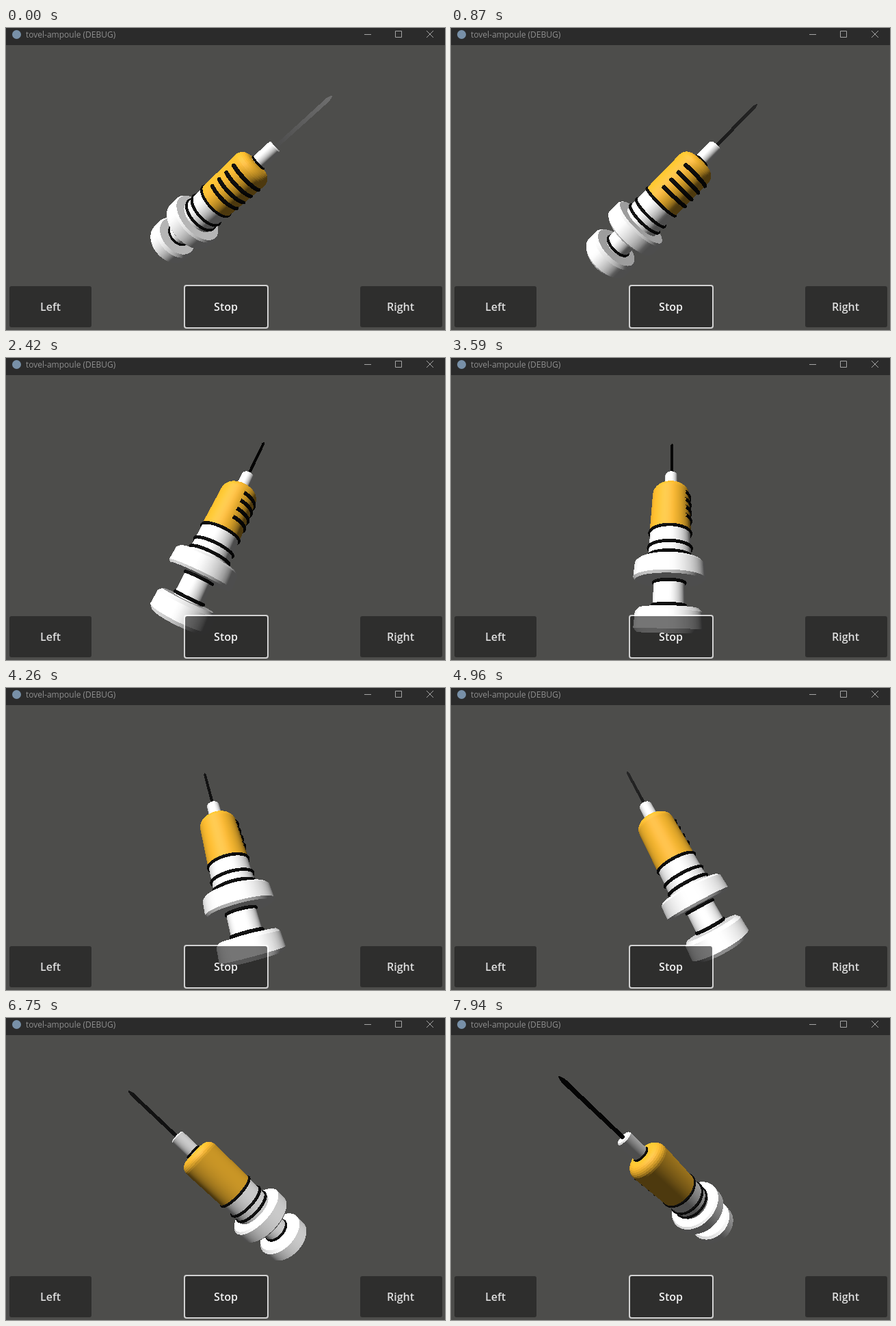
Recreate the animation shown at these times as an HTML page with a canvas. Size 642 by 441 pixels, loop 7.99 s.

```html
<!DOCTYPE html>
<html lang="en">
<head>
<meta charset="utf-8">
<title>Syringe</title>
<style>
  html, body { margin: 0; width: 100%; height: 100%; overflow: hidden; background: #4d4d4b; }
  canvas { display: block; }
</style>
</head>
<body>
<canvas id="stage" width="642" height="441"></canvas>
<script>
const W = 642, H = 441, LOOP = 7990, STEP = 50;
const ctx = document.getElementById('stage').getContext('2d');
const image = ctx.createImageData(W, H);
const pixels = new Uint32Array(image.data.buffer);
const nearest = new Float32Array(W * H);

// Camera: one unit from the pivot, pitched down
const FOCAL = 271, CX = 321, CY = 235;
const PITCH = 15 * Math.PI / 180, TILT = 44.5 * Math.PI / 180;
const SPIN = 0.5, FACING_AWAY = 3.6;
const SAG = 0.014; // how far the body's axis lies below the pivot
const AMBIENT = 0.0718, SUN = 1.1;
const BACK = 0xff4b4d4d;
const SEGMENTS = 48;

const unit = v => { const l = Math.hypot(...v) || 1; return v.map(k => k / l); };
const LIGHT = unit([-0.41, 0.715, 0.57]);
const HALF = unit([LIGHT[0], LIGHT[1], LIGHT[2] + 1]);
const dot = (a, b) => a[0] * b[0] + a[1] * b[1] + a[2] * b[2];

const WHITE = { albedo: [1, 1, 1], gloss: 0.05 };
const ORANGE = { albedo: [1, 0.52, 0.025], gloss: 0.06 };
const BLACK = { albedo: [0.002, 0.002, 0.002], gloss: 0.004 };
const NEEDLE = { metal: true };

// Body space: [along the axis, sideways, upwards]
const meshes = [];

// A profile is a list of [position, radius] with rising position
function revolve(mat, profile) {
  for (let i = 1; i < profile.length; i++) {
    const [s0, r0] = profile[i - 1], [s1, r1] = profile[i];
    const [ns, nr] = unit([r0 - r1, s1 - s0]);
    const row = (s, r) => Array.from({ length: SEGMENTS + 1 }, (_, k) => {
      const a = k / SEGMENTS * 2 * Math.PI, x = Math.sin(a), y = Math.cos(a);
      return { p: [s, r * x, r * y - SAG], n: [ns, nr * x, nr * y] };
    });
    meshes.push({ mat, rows: [row(s0, r0), row(s1, r1)] });
  }
}

function hoop(s, radius, tube, from = 0, to = 2 * Math.PI) {
  const count = Math.ceil(SEGMENTS * (to - from) / (2 * Math.PI));
  const rows = [];
  for (let j = 0; j <= 8; j++) {
    const b = j / 8 * 2 * Math.PI, ns = Math.sin(b), nr = Math.cos(b);
    rows.push(Array.from({ length: count + 1 }, (_, k) => {
      const a = from + (to - from) * k / count, x = Math.sin(a), y = Math.cos(a);
      const r = radius + tube * nr;
      return { p: [s + tube * ns, r * x, r * y - SAG], n: [ns, nr * x, nr * y] };
    }));
  }
  meshes.push({ mat: BLACK, rows });
}

function disc(s0, s1, r, bevel) {
  revolve(WHITE, [[s0, 0], [s0, r - bevel], [s0 + bevel, r], [s1 - bevel, r], [s1, r - bevel], [s1, 0]]);
}

const dome = Array.from({ length: 9 }, (_, i) => {
  const a = i / 8 * Math.PI / 2;
  return [0.165 + 0.05 * Math.sin(a), 0.057 + 0.051 * Math.cos(a)];
});
revolve(ORANGE, [[-0.085, 0.108], ...dome, [0.217, 0]]);
revolve(WHITE, [[-0.25, 0.105], [-0.085, 0.105]]);
revolve(WHITE, [[0.2, 0.04], [0.326, 0.039], [0.332, 0.034], [0.332, 0]]);
revolve(WHITE, [[-0.445, 0.071], [-0.32, 0.071]]);
disc(-0.323, -0.238, 0.165, 0.01);
disc(-0.522, -0.435, 0.142, 0.014);
revolve(NEEDLE, [[0.32, 0.009], [0.618, 0.009], [0.635, 0.003], [0.635, 0]]);
for (const s of [-0.085, -0.167, -0.213]) hoop(s, 0.107, 0.008);
for (const s of [-0.33, -0.424]) hoop(s, 0.072, 0.007);
hoop(0.222, 0.039, 0.006);
for (let i = 0; i < 4; i++) hoop(0.139 - 0.05 * i, 0.107, 0.011, 0.8, 2.72);

const toByte = x => 255 * Math.pow(Math.min(1, x), 1 / 2.2);
const bump = (x, mid, width) => Math.exp(-(((x - mid) / width) ** 2));

function shade(mat, n, s, angle) {
  if (mat.metal) {
    const along = 0.68 + 0.32 * Math.min(1, Math.max(0, (s - 0.32) / 0.15));
    const g = 4 + along * (105 * bump(angle, -1.81, 0.4) + 42 * bump(angle, 0.95, 0.65));
    return [g, g, g];
  }
  const lit = Math.max(0, dot(n, LIGHT));
  const shine = lit > 0 ? mat.gloss * Math.pow(Math.max(0, dot(n, HALF)), 20) : 0;
  return mat.albedo.map(c => toByte(c * (AMBIENT + lit * SUN) + shine));
}

// Axes of the body as seen by the camera: right, up, towards the viewer
function bodyAxes(angle) {
  const sin = Math.sin(angle), cos = Math.cos(angle);
  const c = Math.cos(TILT), s = Math.sin(TILT);
  const sp = Math.sin(PITCH), cp = Math.cos(PITCH);
  return [
    [-c * sin, s, -c * cos],
    [cos, 0, -sin],
    [s * sin, c, s * cos]
  ].map(([x, y, z]) => [x, y * cp - z * sp, y * sp + z * cp]);
}

function triangle(a, b, c) {
  const area = (b.x - a.x) * (c.y - a.y) - (b.y - a.y) * (c.x - a.x);
  if (Math.abs(area) < 1e-6) return;
  const x0 = Math.max(0, Math.ceil(Math.min(a.x, b.x, c.x) - 0.5));
  const x1 = Math.min(W - 1, Math.floor(Math.max(a.x, b.x, c.x) - 0.5));
  const y0 = Math.max(0, Math.ceil(Math.min(a.y, b.y, c.y) - 0.5));
  const y1 = Math.min(H - 1, Math.floor(Math.max(a.y, b.y, c.y) - 0.5));
  for (let y = y0; y <= y1; y++) {
    for (let x = x0; x <= x1; x++) {
      const px = x + 0.5, py = y + 0.5;
      const u = ((b.x - px) * (c.y - py) - (b.y - py) * (c.x - px)) / area;
      const v = ((c.x - px) * (a.y - py) - (c.y - py) * (a.x - px)) / area;
      const w = 1 - u - v;
      if (u < 0 || v < 0 || w < 0) continue;
      const near = u * a.near + v * b.near + w * c.near, i = y * W + x;
      if (near <= nearest[i]) continue;
      nearest[i] = near;
      const mix = k => u * a.rgb[k] + v * b.rgb[k] + w * c.rgb[k] + 0.5;
      pixels[i] = (255 << 24) | (mix(2) << 16) | (mix(1) << 8) | mix(0);
    }
  }
}

function drawSyringe(angle) {
  pixels.fill(BACK);
  nearest.fill(0);
  const [d, e, f] = bodyAxes(angle);
  const turn = v => [0, 1, 2].map(k => v[0] * d[k] + v[1] * e[k] + v[2] * f[k]);
  const project = (mat, { p, n }) => {
    const [x, y, z] = turn(p), near = 1 / (1 - z);
    return {
      x: CX + FOCAL * x * near, y: CY - FOCAL * y * near, near,
      rgb: shade(mat, turn(n), p[0], angle)
    };
  };
  for (const { mat, rows } of meshes) {
    const grid = rows.map(row => row.map(v => project(mat, v)));
    for (let j = 1; j < grid.length; j++) {
      for (let k = 1; k < grid[j].length; k++) {
        const a = grid[j - 1][k - 1], b = grid[j - 1][k], c = grid[j][k], g = grid[j][k - 1];
        triangle(a, b, c);
        triangle(a, c, g);
      }
    }
  }
  ctx.putImageData(image, 0, 0);
}

function box(x, y, w, h, r) {
  ctx.beginPath();
  ctx.roundRect(x, y, w, h, r);
}

function drawButton(label, x, middle, focused) {
  ctx.fillStyle = 'rgba(25, 25, 25, 0.6)';
  box(x, 377, 120, 60, 3);
  ctx.fill();
  if (focused) {
    ctx.strokeStyle = 'rgba(255, 255, 255, 0.75)';
    ctx.lineWidth = 2;
    box(x - 1, 376, 122, 62, 3);
    ctx.stroke();
  }
  ctx.font = '600 16px "Open Sans", sans-serif';
  ctx.textAlign = 'center';
  ctx.fillStyle = focused ? '#f2f2f2' : '#dfdfdf';
  ctx.fillText(label, middle, 413);
}

function drawTitleBar() {
  ctx.fillStyle = '#2b2b2b';
  ctx.fillRect(0, 0, W, 25);
  ctx.fillStyle = '#7890a8';
  ctx.beginPath();
  ctx.arc(15.5, 9.5, 6.5, 0, 2 * Math.PI);
  ctx.fill();
  ctx.font = '12px "Open Sans", sans-serif';
  ctx.textAlign = 'left';
  ctx.fillStyle = '#8f8f8f';
  ctx.fillText('tovel-ampoule (DEBUG)', 29, 14);
  ctx.strokeStyle = '#a6a6a6';
  ctx.lineWidth = 1;
  ctx.beginPath();
  ctx.moveTo(524, 9.5);
  ctx.lineTo(534, 9.5);
  ctx.rect(569.5, 4.5, 9, 9);
  ctx.moveTo(615, 4);
  ctx.lineTo(625, 14);
  ctx.moveTo(625, 4);
  ctx.lineTo(615, 14);
  ctx.stroke();
}

let shown = -1;
function frame() {
  const step = Math.floor(performance.now() % LOOP / STEP);
  if (step !== shown) {
    shown = step;
    drawSyringe(SPIN * (step * STEP / 1000 - FACING_AWAY));
    drawTitleBar();
    drawButton('Left', 5, 65);
    drawButton('Stop', 262, 321.5, true);
    drawButton('Right', 518, 577);
  }
  requestAnimationFrame(frame);
}
frame();
</script>
</body>
</html>
```
